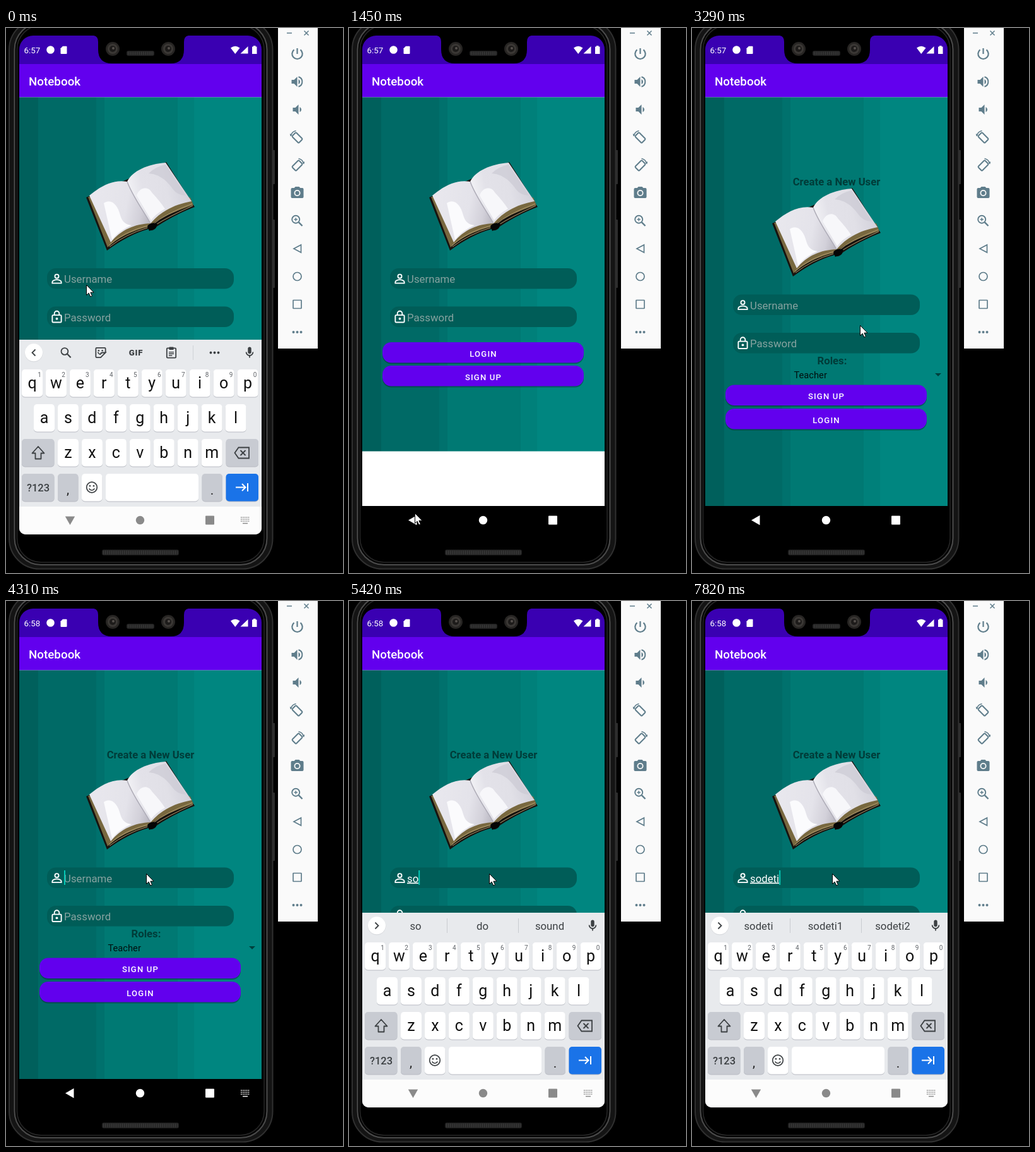
Animation, 534 px wide and 862 px high, one loop 8000 ms. Source, as an HTML page:

```html
<!DOCTYPE html>
<html lang="en">
<head>
<meta charset="utf-8">
<title>Notebook sign up</title>
<style>
  html, body { margin: 0; width: 100%; height: 100%; overflow: hidden; background: #000; }
  svg { display: block; width: 100vw; height: 100vh; font-family: Roboto, "Noto Sans", sans-serif; }
</style>
</head>
<body>
<svg id="stage" viewBox="0 0 534 862"></svg>
<script>
const LOOP = 8000;
const stage = document.getElementById('stage');

// Markup helpers
const rect = (x, y, w, h, fill, rx = 0, extra = '') =>
  `<rect x="${x}" y="${y}" width="${w}" height="${h}" rx="${rx}" fill="${fill}" ${extra}/>`;
const circle = (x, y, r, fill, extra = '') => `<circle cx="${x}" cy="${y}" r="${r}" fill="${fill}" ${extra}/>`;
const text = (x, y, size, fill, str, extra = '') =>
  `<text x="${x}" y="${y}" font-size="${size}" fill="${fill}" ${extra}>${str}</text>`;
const path = (d, fill, extra = '') => `<path d="${d}" fill="${fill}" ${extra}/>`;
const line = (d, color, w, extra = '') => path(d, 'none', `stroke="${color}" stroke-width="${w}" ${extra}`);
// Places 24-unit icon art centred on a point
const icon = (x, y, scale, art) => `<g transform="translate(${x} ${y}) scale(${scale}) translate(-12 -12)">${art}</g>`;
const MID = 'text-anchor="middle"';

const bands = [[0, '#00605c'], [30, '#006a66'], [122, '#00716d'], [135, '#007973'], [251, '#00807a'], [277, '#008680']];
const stops = bands.map(([x, c], i) => {
  const end = i + 1 < bands.length ? bands[i + 1][0] : 384;
  return `<stop offset="${x / 384}" stop-color="${c}"/><stop offset="${end / 384}" stop-color="${c}"/>`;
}).join('');

const defs = `<defs>
  <linearGradient id="teal">${stops}</linearGradient>
  <linearGradient id="leftPage" x1="0" y1=".3" x2="1" y2=".5">
    <stop offset="0" stop-color="#e9e8ee"/><stop offset=".6" stop-color="#e4e3ea"/>
    <stop offset=".85" stop-color="#d2d0d9"/><stop offset="1" stop-color="#bbb9c3"/>
  </linearGradient>
  <linearGradient id="rightPage" x1="0" y1=".5" x2="1" y2=".3">
    <stop offset="0" stop-color="#f4f4f7"/><stop offset=".25" stop-color="#e3e2e9"/>
    <stop offset=".6" stop-color="#e1e0e7"/><stop offset="1" stop-color="#cfced8"/>
  </linearGradient>
  <clipPath id="screen"><path d="M21 34A22 22 0 0 1 43 12H383A22 22 0 0 1 405 34V791A10 10 0 0 1 395 801H31A10 10 0 0 1 21 791Z"/></clipPath>
</defs>`;

function phone() {
  const grille = (x, y, w, h) => rect(x, y, w, h, '#222', 3) +
    line(`M${x + 2} ${y + h / 2}H${x + w - 2}`, '#3b3b3b', h - 3, 'stroke-dasharray="1.5 1.5"');
  const camera = x => circle(x, 33, 11, '#272523') + circle(x, 33, 8, '#3b3835') +
    circle(x, 33, 5, '#1d1b1a') + circle(x + 1, 32, 2, '#55504c');
  const frame = rect(422, 193, 4, 54, '#2c2c2c', 1) + rect(422, 303, 4, 108, '#2c2c2c', 1) +
    rect(5, -14, 417.5, 869.5, '#141414', 48, 'stroke="#303030" stroke-width="2"') +
    rect(13.5, -8, 400, 857, '#050505', 42, 'stroke="#4b4b4b" stroke-width="2"') +
    rect(17.5, -4, 391.5, 849, '#000', 38, 'stroke="#262626" stroke-width="1.5"') +
    grille(152, 825, 122, 9);
  const notch = path('M139 0V12Q146 13 146 22V34Q146 56 168 56H261Q282 56 282 34V22Q282 13 289 12V0Z', '#000') +
    camera(169) + camera(257) + grille(191, 36, 44, 8);
  return { frame, notch };
}

function toolbar() {
  const c = '#5f7d8b';
  const at = (y, art, s = 1) => icon(461.5, y, s, art);
  const ring = (w = 1.8) => `stroke="${c}" stroke-width="${w}"`;
  const turn = rect(4.5, 8, 15, 9, 'none', 1.5, `${ring(2)} transform="rotate(45 12 12.5)"`) +
    line('M2 10A10 10 0 0 1 10 1.5M2 10L1 6.5', c, 1.6);
  const cone = x => `M${x} 9v6h4l5 5V4L${x + 4} 9z`;
  return rect(431, 0, 63, 507, '#fafafa') +
    line('M445 8H453', c, 1.5) + line('M472.5 4.5L479.5 11.5M479.5 4.5L472.5 11.5', c, 1.5) +
    at(41, line('M12 3V12', c, 2.2) + line('M7 5.3A8.2 8.2 0 1 0 17 5.3', c, 2.2)) +
    at(85, path(cone(3), c) + path('M16.5 12c0-1.77-1.02-3.29-2.5-4.03v8.05c1.48-.73 2.5-2.25 2.5-4.02z', c) +
      line('M14 4.3A8 8 0 0 1 14 19.7', c, 2)) +
    at(129, path(cone(5), c) + path('M18.5 12c0-1.77-1.02-3.29-2.5-4.03v8.05c1.48-.73 2.5-2.25 2.5-4.02z', c)) +
    at(173, turn) + at(217, `<g transform="matrix(-1 0 0 1 24 0)">${turn}</g>`) +
    at(261, path('M9 2L7.2 4H4Q2 4 2 6V18Q2 20 4 20H20Q22 20 22 18V6Q22 4 20 4H16.8L15 2Z', c) +
      circle(12, 12, 5, '#fafafa') + circle(12, 12, 3.2, c)) +
    at(305, circle(9.7, 9.7, 6, 'none', ring(1.9)) + line('M14.2 14.2L20 20', c, 2.4) + line('M7 9.7H12.4M9.7 7V12.4', c, 1.4)) +
    at(349, line('M18 6V18L6.5 12Z', c, 1.7)) +
    at(393, circle(12, 12, 6.5, 'none', ring(1.7))) +
    at(437, rect(5.5, 5.5, 13, 13, 'none', 0.5, ring(1.7))) +
    at(481, [6, 12, 18].map(x => circle(x, 12, 2, c)).join(''));
}

const book = path('M127 268L160 352Q194 327 226 318Q232 324 239 314Q266 296 299 283L254 212Z', '#17130f') +
  path('M130 267L161 347Q184 325 227 314Q244 298 297 280L292 268Z', '#78683f') +
  line('M163 344Q186 322 227 312M232 311Q252 294 295 278M164 346Q190 326 224 316M236 312Q258 298 296 281', '#b29d70', 1) +
  path('M132 265C150 250 170 239 192 243C203 265 218 290 229 309C204 310 182 319 166 339Z', 'url(#leftPage)') +
  path('M192 243C200 226 225 215 253 213L294 274C268 279 246 289 229 309C215 285 200 265 192 243Z', 'url(#rightPage)') +
  path('M155 277C166 269 177 279 181 296C184 307 190 311 199 312Q179 320 168 335Z', '#fbfbfd') +
  path('M207 265C211 252 225 249 231 260Q244 274 252 286Q237 294 230 304Z', '#f7f7fa') +
  path('M226 230Q237 219 253 216L285 265Q271 265 263 253Q247 231 226 230Z', '#cccad5', 'opacity=".7"') +
  line('M192 243C200 265 215 285 229 309', '#aeacb7', 1.5) +
  path('M224 313Q231 306 240 310L237 317L227 321Z', '#050505');

const HINT = '#87a3a0';
const person = circle(12, 8, 3.2, 'none', 'stroke="#fff" stroke-width="2"') +
  path('M4.5 19.5V17.5C4.5 15 9 13.7 12 13.7S19.5 15 19.5 17.5V19.5Z', 'none', 'stroke="#fff" stroke-width="2"');
const lock = rect(4.5, 9, 15, 12, 'none', 1.5, 'stroke="#fff" stroke-width="2"') +
  line('M8 9V6.2A4 4 0 0 1 16 6.2V9', '#fff', 2) + circle(12, 15, 2, '#fff');
const field = (y, art, inner) => rect(65, y, 296, 32.5, '#005d58', 14) + icon(80.5, y + 16.5, .95, art) + inner;
const hint = (y, str) => text(92, y + 23, 16.8, HINT, str);
const button = (y, str) => rect(53, y + 1.5, 319, 33, '#00302d', 14, 'opacity=".45"') +
  rect(53, y, 319, 32.5, '#6200ee', 14) +
  text(213, y + 22.5, 13.1, '#fff', str, `${MID} font-weight="500" letter-spacing="1.17"`);
const caretRect = (id, y) => rect(92, y, 2, 23, '#03c9b6', 0, `id="${id}"`);

const windowBase = bottom => rect(21, 12, 384, 46, '#3a00b2') + rect(21, 57, 384, 53, '#6200ee') +
  rect(21, 109.5, 384, 647, '#fff') + rect(21, 109.5, 384, bottom - 109.5, 'url(#teal)') +
  rect(21, 756, 384, 45, '#000') + text(36, 91, 18.8, '#fff', 'Notebook', 'font-weight="500"');

const login = windowBase(669.5) + book +
  field(380, person, hint(380, 'Username')) + caretRect('loginCaret', 385) +
  field(440.5, lock, hint(440.5, 'Password')) +
  button(497, 'LOGIN') + button(534, 'SIGN UP');

const signup = windowBase(756) + `<g transform="translate(0 41)">${book}</g>` +
  text(229, 249, 16.7, '#003c39', 'Create a New User', `${MID} font-weight="700"`) +
  field(421.5, person, `<g id="nameHint">${hint(421.5, 'Username')}</g>` +
    `<text id="typed" x="92" y="444.5" font-size="16.8" fill="#fff"><tspan id="composed" text-decoration="underline"></tspan><tspan id="fresh"></tspan></text>`) +
  caretRect('nameCaret', 426) +
  field(482, lock, hint(482, 'Password')) +
  text(222, 532, 16.7, '#003c39', 'Roles:', `${MID} font-weight="700"`) +
  text(161.5, 553.5, 14.7, '#00100f', 'Teacher') + path('M385 546H395L390 551Z', '#003f3c') +
  button(564.5, 'SIGN UP') + button(602, 'LOGIN');

function keyboard() {
  const ink = '#3c4043', gray = '#c8cbd2';
  const key = (x, y, w, fill = '#fff') => rect(x, y + 1, w, 43.5, '#b9bcc3', 5) + rect(x, y, w, 43.5, fill, 5);
  const row = (letters, x, y) => [...letters].map((ch, i) =>
    key(x + i * 37.95 - 16.5, y, 33) + text(x + i * 37.95, y + 29.5, 25, '#111', ch, MID)).join('');
  const digits = [...'1234567890'].map((d, i) => text(53 + i * 37.95, 551.5, 10, '#5f6368', d, MID)).join('');
  const tools = icon(95, 513.5, .9, circle(9.7, 9.7, 6, 'none', `stroke="${ink}" stroke-width="2"`) + line('M14 14L20.5 20.5', ink, 2.4)) +
    icon(150, 513.5, .9, line('M20.5 12V5Q20.5 3.5 19 3.5H5Q3.5 3.5 3.5 5V19Q3.5 20.5 5 20.5H12L20.5 12H15Q12 12 12 15', ink, 2) +
      line('M7 11Q9 15 12 15', ink, 1.6) + circle(8.5, 8.5, 1.4, ink) + circle(15, 8.5, 1.4, ink)) +
    text(206, 518, 13.2, ink, 'GIF', `${MID} font-weight="900" letter-spacing=".7"`) +
    icon(262, 513.5, .9, rect(4, 4, 16, 17, 'none', 1.5, `stroke="${ink}" stroke-width="2"`) + rect(8, 2, 8, 5, ink, 1) +
      line('M7.5 11H16.5M7.5 14H16.5M7.5 17H13.5', ink, 1.6)) +
    line('M296.5 502V525', '#cfd2d7', 1) + [324.5, 330.5, 336.5].map(x => circle(x, 513.5, 1.9, ink)).join('') +
    line('M46.5 508.5L41.5 513.5L46.5 518.5', ink, 1.8);
  const words = [105.5, 211.5, 318].map((x, i) => text(x, 519.5, 16.8, ink, '', `${MID} id="word${i}"`)).join('') +
    line('M155.5 502V525M268.5 502V525', '#c9ccd1', 1) + line('M41.5 508.5L46.5 513.5L41.5 518.5', ink, 1.8);
  return rect(21, 493, 384, 320, '#e8eaed') + rect(21, 757, 384, 320, '#fcfcfc') +
    circle(44, 514, 14.3, '#d5d7db') + circle(44, 513.3, 14, '#fff') +
    `<g id="tools">${tools}</g><g id="words">${words}</g>` +
    icon(386, 513.5, .9, path('M9 5A3 3 0 0 1 15 5V11A3 3 0 0 1 9 11Z', ink) + line('M6 11A6 6 0 0 0 18 11M12 17V21', ink, 2)) +
    row('qwertyuiop', 41.5, 540) + digits + row('asdfghjkl', 60.5, 595) + row('zxcvbnm', 98.5, 650) +
    key(25, 650, 51.5, gray) + line('M51 662L41.5 672.5H46.5V681.5H55.5V672.5H60.5Z', ink, 1.8, 'stroke-linejoin="round"') +
    key(348.5, 650, 51.5, gray) + line('M368.5 663.5H385V680.5H368.5L362.5 672Z', ink, 1.8) +
    line('M371.5 668L379.5 676M379.5 668L371.5 676', ink, 1.8) +
    key(25, 705, 51.5, gray) + text(51, 732.5, 16.5, ink, '?123', `${MID} font-weight="500"`) +
    key(82, 705, 32.5, gray) + text(98, 737, 21, '#222', ',', MID) +
    key(120, 705, 32.5) + circle(136, 726.5, 8.3, 'none', `stroke="${ink}" stroke-width="1.7"`) +
    circle(133, 724.3, 1.3, ink) + circle(139, 724.3, 1.3, ink) + line('M131.5 728.5Q136 734 140.5 728.5', ink, 1.7) +
    key(158, 705, 147) + key(310.5, 705, 32.5, gray) + text(326.5, 738, 21, '#222', '.', MID) +
    key(348.5, 705, 51.5, '#1a73e8') + line('M364 726.5H379M374 721L379.5 726.5L374 732M383 720V733', '#fff', 2);
}

const status = text(28.5, 39.5, 13.3, '#fff', '', 'id="clock"') + circle(70.5, 34.5, 6.3, '#fff') +
  path('M90 28.7H95.5Q96.5 28.7 96.5 29.7V40Q96.5 41 95.5 41H87.5Q86.5 41 86.5 40V32.2Z', '#fff') +
  path('M356 31.5Q363.2 26 370.5 31.5L363.2 41Z', '#fff') + path('M383.5 29V40.5H371.5Z', '#fff') +
  path('M392 28H395.5V29.5H397.5V41H390V29.5H392Z', '#fff');

const nav = `<g id="nav">${path('M94 778.5L107.5 770.8V786.2Z', 'inherit', 'id="back"')}` +
  '<circle cx="212.5" cy="778.5" r="6.7"/><rect x="316" y="771.5" width="14" height="14" rx="1"/>' +
  '<g id="switcher">' + [774, 777, 780].map(y =>
    line(`M372 ${y}H386`, 'currentColor', 1.7, 'stroke-dasharray="1.7 1.2"')).join('') +
  line('M375 783.5H383', 'currentColor', 1.3) + '</g></g>';

const pointer = path('M.5 .5V16.5L4.2 13.2L6.8 19L9.4 17.8L6.9 12.2H12Z', '#fff', 'id="pointer" stroke="#000" stroke-width="1"');

const shell = phone();
stage.innerHTML = defs + rect(0, 0, 534, 862, '#000') + shell.frame +
  `<g clip-path="url(#screen)"><g id="login">${login}</g><g id="signup">${signup}</g>` +
  `<g id="keyboard">${keyboard()}</g>${nav}${status}</g>` + shell.notch + toolbar() + pointer;

const el = {};
stage.querySelectorAll('[id]').forEach(n => { el[n.id] = n; });

// Stepped tracks: [start, ...values]; each holds until the next
const pointerTrack = [[0, 127, 406], [370, 212, 420], [520, 402, 465], [670, 330, 610], [790, 190, 772], [940, 150, 770],
  [1060, 104, 767], [1600, 113, 760], [1750, 191, 646], [1900, 219, 612], [2020, 213, 578], [2140, 205, 558], [2290, 206, 556],
  [3290, 266, 470], [3410, 172, 446], [3560, 232, 436], [3680, 222, 431]];
// keyboard offset, back arrow turn
const boardTrack = [[0, 0, -90], [1210, 22, -70], [1330, 150, -30], [1450, 400, 0], [4460, 11, -22], [4610, 0, -90]];
// login scale, signup scale, signup opacity
const sceneTrack = [[0, 1, 1, 0], [2590, 1.0328, .948, .63], [2710, 1.05, .988, .95], [2830, 1, 1, 1]];
const USER = 'sodeti';
const numbered = [USER + 1, USER + 2];
// typed letters, underlined letters, suggestions
const typeTrack = [[0, 0, 0, null], [5150, 1, 0, null], [5270, 2, 0, null], [5420, 2, 2, ['so', 'do', 'sound']],
  [5950, 3, 2, ['so', 'do', 'sound']], [6070, 4, 2, ['so', 'do', 'sound']], [6220, 4, 4, ['sode', ...numbered]],
  [6340, 5, 4, ['sode', ...numbered]], [6590, 5, 5, ['sodet', ...numbered]], [6740, 6, 5, ['sodet', ...numbered]],
  [6860, 6, 6, [USER, ...numbered]]];
const loginCaretTrack = [[0, false], [670, true], [1210, false], [1750, true], [2290, false]];
const nameCaretTrack = [[0, false], [3830, true], [4880, false], [5150, true], [7420, false], [7820, true]];

const at = (track, t) => track.findLast(step => step[0] <= t).slice(1);
const show = (node, on) => node.setAttribute('display', on ? 'inline' : 'none');
const zoom = (node, s) => node.setAttribute('transform', `translate(213 406.5) scale(${s}) translate(-213 -406.5)`);

function draw(t) {
  const [px, py] = at(pointerTrack, t);
  el.pointer.setAttribute('transform', `translate(${px} ${py})`);

  const [loginScale, signupScale, alpha] = at(sceneTrack, t);
  zoom(el.login, loginScale);
  zoom(el.signup, signupScale);
  show(el.login, alpha < 1);
  show(el.signup, alpha > 0);
  el.signup.setAttribute('opacity', alpha);

  const [drop, turn] = at(boardTrack, t);
  const open = drop < 100;
  show(el.keyboard, drop < 400);
  el.keyboard.setAttribute('transform', `translate(0 ${drop})`);
  el.back.setAttribute('transform', `rotate(${turn} 101.5 778.5)`);
  el.nav.setAttribute('fill', open ? '#8a8a8a' : '#fff');
  el.nav.setAttribute('color', open ? '#8a8a8a' : '#fff');
  show(el.switcher, open || t >= 4310);

  const [count, lined, words] = at(typeTrack, t);
  el.composed.textContent = USER.slice(0, lined);
  el.fresh.textContent = USER.slice(lined, count);
  show(el.nameHint, count === 0);
  show(el.tools, !words);
  show(el.words, words);
  if (words) words.forEach((w, i) => { el['word' + i].textContent = w; });

  show(el.loginCaret, at(loginCaretTrack, t)[0]);
  show(el.nameCaret, at(nameCaretTrack, t)[0]);
  el.nameCaret.setAttribute('x', 92 + (count ? el.typed.getComputedTextLength() : 0));
  el.clock.textContent = t < 3830 ? '6:57' : '6:58';
}

const start = performance.now();
function tick() {
  draw((performance.now() - start) % LOOP);
  requestAnimationFrame(tick);
}
tick();
</script>
</body>
</html>
```
